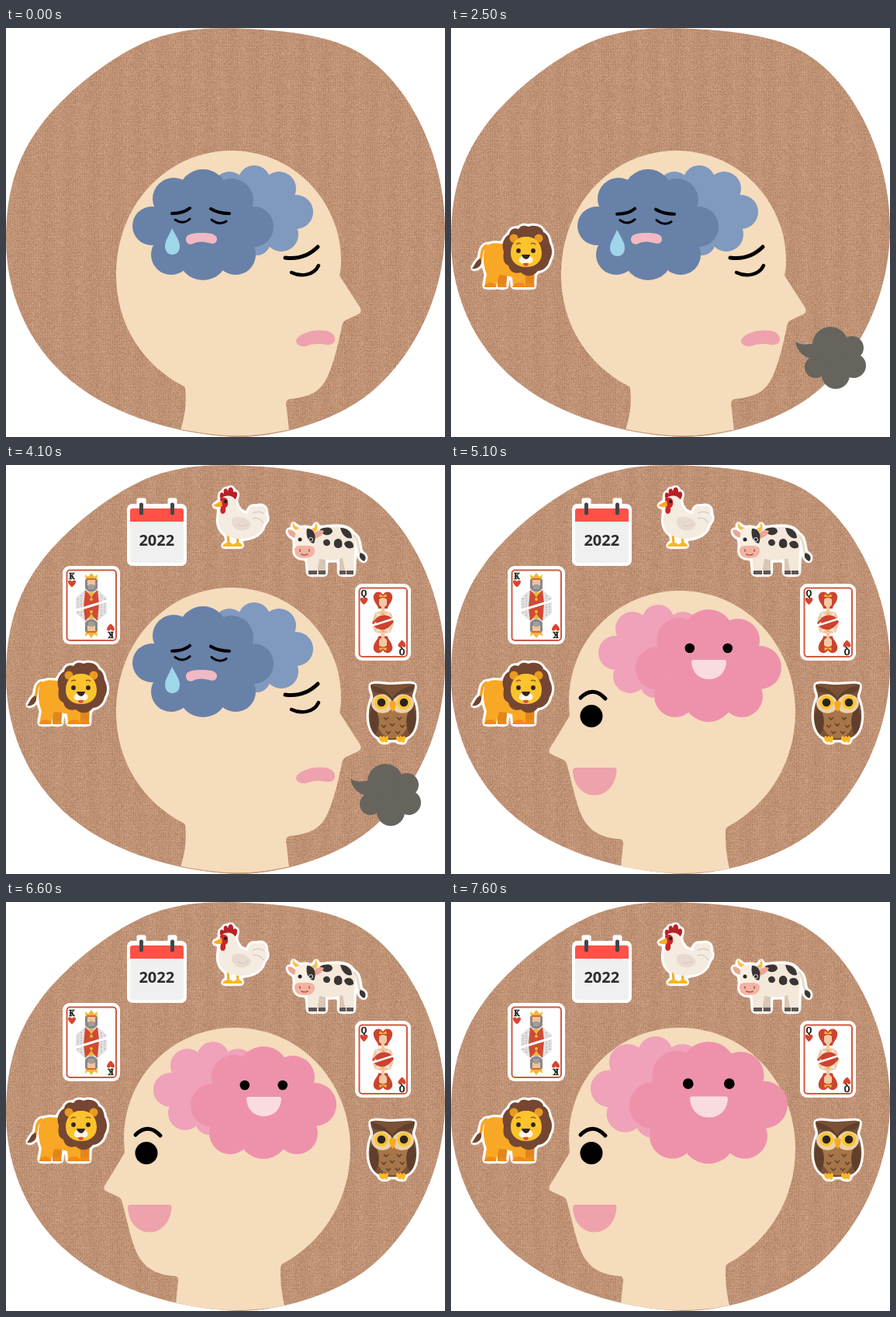
These frames come from a looping animation (566 by 527 pixels, 8 s). An HTML page with a canvas:

```html
<!DOCTYPE html>
<html lang="en">
<head>
<meta charset="utf-8">
<title>Memory</title>
<style>
html, body { margin: 0; width: 100%; height: 100%; overflow: hidden; background: #fff; }
canvas, svg { position: absolute; left: 0; top: 0; width: 566px; height: 527px; }
.line { fill: none; stroke: #000; stroke-linecap: round; stroke-linejoin: round; }
.sticker { filter: url(#rim); }
.year { font: 700 20px "Open Sans", "Noto Sans", sans-serif; fill: #2d2d2d; text-anchor: middle; }
.pip { font: 700 10px "Noto Serif", "Liberation Serif", serif; fill: #222; stroke: #222; stroke-width: .5; text-anchor: middle; }
</style>
</head>
<body>
<canvas id="cork" width="566" height="527"></canvas>
<svg viewBox="0 0 566 527">
  <defs>
    <filter id="rim" x="-15%" y="-15%" width="130%" height="130%" color-interpolation-filters="sRGB">
      <feGaussianBlur in="SourceAlpha" stdDeviation="2"/>
      <feColorMatrix values="0 0 0 0 1  0 0 0 0 1  0 0 0 0 1  0 0 0 12 -.4"/>
      <feMerge><feMergeNode/><feMergeNode in="SourceGraphic"/></feMerge>
    </filter>
    <clipPath id="blob"><path id="blobPath"/></clipPath>
    <path id="heart" d="M0 4.5C-3 2-5-.5-5-2.5C-5-5-1.5-5.5 0-2.8C1.5-5.5 5-5 5-2.5C5-.5 3 2 0 4.5Z" fill="#d8432f"/>
    <g id="kingHalf">
      <path d="M-8-20L-14-15L-20-10V5L20-6V-10L14-15L8-20Z" fill="#e3e1e2"/>
      <path d="M-17-9V3M-13-13V2M13-13V-5M17-9V-6" stroke="#9b9ba3" stroke-width="1.2" stroke-dasharray="1.2 2.2"/>
      <path d="M-8-20L0-12L8-20L10 -3L-10 3Z" fill="#cf4b33"/>
      <path d="M-4-17L0-10L4-17Z" fill="#f0b73a"/>
      <circle cy="-8" r="2" fill="#f0b73a"/>
      <path d="M-8-34H8V-22Q0-13-8-22Z" fill="#8b8788"/>
      <path d="M-5-34H5V-26Q0-22-5-26Z" fill="#efc39b"/>
      <path d="M-4-26Q0-29 4-26V-21H-4Z" fill="#a39d9a"/>
      <path d="M-7-33L-8-40L-4-37L0-42L4-37L8-40L7-33Z" fill="#f0b73a"/>
      <path d="M-6-34H6" stroke="#cf4b33" stroke-width="1.5"/>
    </g>
    <g id="queenHalf">
      <path d="M0-36C-4-43-14-39-12-31C-11-25-6-22-6-18H6C6-22 11-25 12-31C14-39 4-43 0-36Z" fill="#cc432e"/>
      <path d="M-5-30Q0-34 5-30V-23Q0-16-5-23Z" fill="#f3c8a4"/>
      <path d="M-5-33L-4-37L0-34L4-37L5-33Z" fill="#f0b73a"/>
      <path d="M-2-20H2V-15L10-13L14-4L9 1L7-7L6-3L-8 3L-14-2L-10-13L-2-15Z" fill="#f3c8a4"/>
      <path d="M-9-14Q0-6 9-14L7-4L-7 1Z" fill="#eee4df"/>
      <path d="M-7-7Q0-12 8-8L13-4L-12 4L-14 0Z" fill="#cc432e"/>
      <circle cy="-11" r="1.8" fill="#f0b73a"/>
    </g>
  </defs>

  <g id="sad">
    <path clip-path="url(#blob)" fill="#f5dcbc" d="M142 318C142 225 210 158 290 158C370 158 432 222 432 300C432 308 431 315 430 319L457 361Q459 366 454 369L437 377Q434 379 433 384C429 404 424 427 416 446C407 468 394 475 366 478Q361 479 361 484L365 518Q300 533 225 518Q234 490 231 465Q231 462 228 461C177 434 142 383 142 318Z"/>
    <path d="M225 517.5C250 522 275 526 300 526.2C323 526 345 522 365 518" fill="none" stroke="#c99a70" stroke-width="1"/>
    <g data-cloud="sadBack" fill="#8099be"></g>
    <g data-cloud="sadFront" fill="#6881a8"></g>
    <path fill="#f0b9c3" d="M232 272C232 265 243 264 252 264C262 264 272 265 272 272C272 277 267 279 262 277C255 275 247 275 241 278C236 280 232 277 232 272Z"/>
    <g id="droop">
      <path class="line" stroke-width="4" d="M214 239Q229 239 237 232M264 233Q274 239 288 239"/>
      <path class="line" stroke-width="3" d="M218 247Q228 254 237 246M265 247Q275 255 284 249"/>
    </g>
    <path id="tear" fill="#9fd6ea" d="M214 258C218 266 224 274 224 281C224 288 220 292 214.5 292C209 292 205 288 205 281C205 274 211 266 214 258Z"/>
    <path class="line" stroke-width="5" d="M360 296C375 298 390 294 402 282"/>
    <path class="line" stroke-width="4.5" d="M368 315C380 321 397 319 403 306"/>
    <path fill="#eda2ae" d="M374 404C374 396 390 390 403 389.500C418 389 424 394 424 401C424 407 418 409 412 408C402 406 394 407 387 410C381 411 375 409 374 404Z"/>
  </g>

  <g id="smoke" fill="#66645d">
    <g data-cloud="puff"></g>
    <path d="M444 404C451 409 459 408 469 406L473 426C458 428 446 418 444 404Z"/>
  </g>

  <g id="happy">
    <path clip-path="url(#blob)" fill="#f5dcbc" d="M152 305C152 225 215 162 295 162C378 162 444 230 444 318C444 383 409 438 357 466Q354 468 354 472Q353 496 359 520Q290 533 219 518L222 487Q222 482 217 482C188 480 174 467 166 446C159 427 155 405 150 388Q149 382 145 380L130 373Q125 371 127 366L153 323Z"/>
    <g id="brainBack"><g data-cloud="joyBack" fill="#efa2b9"></g></g>
    <g id="brainFront">
      <g data-cloud="joyFront" fill="#ee92ac"></g>
      <circle cx="307.800" cy="236" r="6.300"/><circle cx="356.700" cy="236" r="6.300"/>
      <path fill="#f9dbe0" d="M310 254Q310 251 313 251H352Q355 251 355 254C354 268 345 276 332.500 276C320 276 311 268 310 254Z"/>
    </g>
    <path class="line" stroke-width="5" d="M167 300Q183 284 199 301"/>
    <circle cx="181" cy="323.500" r="14.500"/>
    <path fill="#eda2ac" d="M161 390H210Q214 390 213.500 394C212 413 200 425.500 185 425.500C169 425.500 158 412 157 394Q157 390 161 390Z"/>
  </g>

  <g id="lion" class="sticker">
    <path d="M47 280C36 284 42 296 36 302" fill="none" stroke="#f5a227" stroke-width="3.500"/>
    <path d="M38 297C42 304 35 312 27 310C31 306 31 300 38 297Z" fill="#70442f"/>
    <path d="M60 312H73L71 334H60ZM93 310H108L107 334H95Z" fill="#e2861c"/>
    <path d="M43 286C45 277 55 276 66 278L95 280L110 300C110 312 103 317 96 319V333H80L79 321C72 319 67 318 62 318L58 334H43L46 317C42 308 41 296 43 286Z" fill="#f9a825"/>
    <path d="M43 334q1-6 8-6t7 6ZM79 334q2-6 9-6t8 6ZM60 334q1-5 6-5t6 5ZM95 334q2-6 7-6t6 6Z" fill="#ef8a1a"/>
    <path d="M87 259C91 253 96 255 100 256C110 252 119 258 119 263C126 266 126 273 127 277C132 286 130 294 127 299C125 309 117 313 112 313C106 321 96 321 90 315C79 318 75 311 74 306C65 302 68 292 68 288C64 278 69 269 75 266C76 259 82 257 87 259Z" fill="#754631"/>
    <circle cx="81" cy="271" r="5.500" fill="#e99a22"/><circle cx="113" cy="271" r="5.500" fill="#e99a22"/>
    <path d="M96 269C109 268 117 278 117 290C117 302 108 308 97 308C86 308 77 302 77 290C77 277 85 269 96 269Z" fill="#fcc32c"/>
    <path d="M84 279q3-3 6-1M103 278q4-2 6 1" fill="none" stroke="#8e5a27" stroke-width="1.500"/>
    <circle cx="87" cy="287" r="2.900" fill="#30251f"/><circle cx="106" cy="287" r="2.900" fill="#30251f"/>
    <path d="M97 294C104 293 107 298 105 301C103 304 99 304 97 302C94 304 90 304 88 301C87 297 90 293 97 294Z" fill="#fff5e8"/>
    <path d="M91 292H102Q101 297 97 298Q92 297 91 292Z" fill="#30251f"/>
    <path d="M93 303H100Q100 307 96.500 307Q93 307 93 303Z" fill="#d95445"/>
  </g>

  <g id="king">
    <rect x="73" y="130" width="74" height="101" rx="9" fill="#fff"/>
    <rect x="78.500" y="135.500" width="63.500" height="90.500" rx="4" fill="none" stroke="#d05a42" stroke-width="2"/>
    <g data-turn="110 181">
      <use href="#kingHalf" x="110" y="181"/>
      <text class="pip" x="85" y="147">K</text>
      <use href="#heart" x="85" y="153"/>
    </g>
    <path d="M88 188L132 174.500" stroke="#fff" stroke-width="3"/>
  </g>

  <g id="calendar">
    <rect x="156" y="50" width="77" height="80" rx="7" fill="#fff"/>
    <path d="M171 45h7v12h-7zM211 45h7v12h-7z" stroke="#fff" stroke-width="5" stroke-linejoin="round" fill="#fff"/>
    <rect x="160" y="56" width="69" height="70" rx="4" fill="#f0f0f0"/>
    <path d="M160 73V59Q160 56 163 56H226Q229 56 229 59V73Z" fill="#ff5147"/>
    <path d="M174.500 51V62M214.500 51V62" stroke="#454545" stroke-width="5" stroke-linecap="round"/>
    <text class="year" x="194.300" y="104">2022</text>
  </g>

  <g id="rooster" class="sticker">
    <path d="M286 90L287 101M298 90L299 101" stroke="#f3ad23" stroke-width="3"/>
    <path d="M279 105q2-5 8-5t7 5ZM292 105q2-5 7-5t6 5Z" fill="#fbb81f"/>
    <path d="M276 42C275 35 278 34 281 37C279 30 285 28 286 34C287 26 294 28 293 35C298 32 300 38 296 44L288 48Z" fill="#b91f25"/>
    <path d="M279 42C286 37 295 40 296 47C298 57 304 62 312 63C313 54 318 51 323 54C331 49 338 57 334 63C340 68 335 74 332 76C331 87 320 94 304 95C287 96 274 86 274 72C274 62 277 54 276 49Z" fill="#f4ebe1"/>
    <path d="M292 69C300 64 312 68 316 76C314 85 301 87 295 81C291 78 290 73 292 69Z" fill="#e8dace"/>
    <path d="M318 62Q327 58 333 63M318 69Q326 66 332 75M299 77q7 4 13-1" fill="none" stroke="#dfcdbf" stroke-width="1.500"/>
    <path d="M276 43Q284 40 286 46Q287 54 283 55Q284 63 279 63Q275 62 277 54Z" fill="#c8272b"/>
    <path d="M278 46L267 52Q272 56 279 53Z" fill="#f9ac20"/>
    <circle cx="283" cy="47" r="2.200" fill="#2b2320"/>
  </g>

  <g id="cow" class="sticker">
    <path d="M447 90C457 95 452 112 459 118" fill="none" stroke="#eadbc9" stroke-width="3"/>
    <path d="M457 113C464 115 465 120 462 124C457 122 454 118 457 113Z" fill="#3b3735"/>
    <path d="M402 118H412V141H402ZM430 115H439V141H430Z" fill="#d9c6b3"/>
    <path d="M394 82C408 82 424 77 438 81C450 84 452 100 449 111L448 141H438L434 120C424 124 415 123 404 121L401 141H390L388 116Z" fill="#f4e8da"/>
    <path d="M390 136h11v5h-11zM403 136h9v5h-9zM430 136h8v5h-8zM439 136h9v5h-9z" fill="#5e5653"/>
    <path d="M405 83C413 79 421 80 421 86C417 93 407 91 405 83ZM431 81C441 81 446 87 446 94C439 96 433 90 431 81ZM409 99C411 94 418 95 418 101C416 106 409 105 409 99ZM424 97C430 92 435 97 433 105C427 110 420 105 424 97ZM436 101C440 95 449 98 448 106C443 109 437 107 436 101Z" fill="#393534"/>
    <path d="M374 84Q368 81 370 74Q373 80 379 81ZM394 82Q400 81 399 74Q405 80 398 87Z" fill="#f6bf46"/>
    <path d="M375 89Q367 81 363 84Q364 93 374 94ZM396 89Q404 82 410 85Q407 94 396 95Z" fill="#eaa795"/>
    <path d="M375 84C381 79 392 79 397 86C400 97 397 109 392 113H377C371 105 371 92 375 84Z" fill="#f9eee2"/>
    <path d="M388 82C397 81 401 91 397 101C390 101 386 91 388 82Z" fill="#393534"/>
    <path d="M372 109C373 103 379 104 385 104C392 104 398 104 398 110C398 118 391 120 385 120C378 120 372 118 372 109Z" fill="#f3b3a1"/>
    <circle cx="379" cy="96" r="2.500" fill="#2d2827"/><circle cx="393" cy="96" r="2.800" fill="#fff"/><circle cx="393" cy="96" r="2" fill="#2d2827"/>
    <path d="M379 109v2M391 109v2M381 115q4 2 8 0" class="line" style="stroke:#a45e54" stroke-width="1.700"/>
  </g>

  <g id="queen">
    <rect x="450" y="153" width="72" height="99" rx="9" fill="#fff"/>
    <rect x="455.500" y="158.500" width="61.500" height="88.500" rx="4" fill="none" stroke="#d05a42" stroke-width="2"/>
    <g data-turn="486 202.800">
      <use href="#queenHalf" x="486" y="203"/>
      <text class="pip" x="461.500" y="169">Q</text>
      <use href="#heart" x="461.500" y="175.500"/>
    </g>
    <path d="M472 207L500 198" stroke="#fff" stroke-width="2.500"/>
  </g>

  <g id="owl" class="sticker">
    <path d="M470 283C477 280 487 283 498 283C509 283 520 280 527 283C527 292 523 295 524 300C532 315 531 340 520 349C509 356 488 356 477 349C466 340 465 315 473 300C474 295 470 291 470 283Z" fill="#7a5135"/>
    <path d="M478 318C488 313 510 313 519 318C522 334 515 351 498 352C482 351 475 334 478 318Z" fill="#a87549"/>
    <path d="M473 310C467 321 467 339 476 347C483 338 483 321 473 310ZM524 310C530 321 530 339 521 347C514 338 514 321 524 310Z" fill="#60402d"/>
    <path d="M487 325l3 3 3-3M504 325l3 3 3-3M495 333l3 3 3-3M484 335l3 3 3-3M508 335l3 3 3-3M490 343l3 3 3-3M502 343l3 3 3-3" fill="none" stroke="#65442f" stroke-width="1.700"/>
    <path d="M498 301C492 292 475 294 471 304C470 317 482 323 493 318L498 313L503 318C514 323 527 317 526 304C522 294 504 292 498 301Z" fill="#ecd1a6"/>
    <path d="M470 283Q490 288 498 300Q506 288 527 283Q525 295 515 294Q503 295 498 305Q493 295 482 294Q472 295 470 283Z" fill="#60402d"/>
    <circle cx="484" cy="306" r="9" fill="#fbc42c"/><circle cx="513" cy="306" r="9" fill="#fbc42c"/>
    <circle cx="484" cy="306" r="5.300" fill="#2b2320"/><circle cx="513" cy="306" r="5.300" fill="#2b2320"/>
    <path d="M494 306Q498 302 503 306Q502 315 498.500 318Q495 315 494 306Z" fill="#f7a91f"/>
    <path d="M481 351q2-4 4 0q2-4 4 0q2-4 4 0l-1 6q-3 2-4-1q-3 3-4 0q-3 0-3-5ZM503 351q2-4 4 0q2-4 4 0q2-4 4 0l-1 6q-3 2-4-1q-3 3-4 0q-3 0-3-5Z" fill="#fbb827"/>
  </g>
</svg>
<script>
const $ = id => document.getElementById(id);
const BLOB = "M285 0C370 2 430 12 465 38C520 75 566 165 566 258C566 340 530 415 478 463C430 507 350 527 300 527C220 525 140 497 95 463C35 420 0 350 0 272C0 210 15 165 45 125C75 85 130 40 180 18C215 3 250 0 285 0Z";
$("blobPath").setAttribute("d", BLOB);

function paintCork() {
  const cv = $("cork"), g = cv.getContext("2d"), img = g.createImageData(566, 527);
  let seed = 7;
  const rnd = () => (seed = (seed * 16807) % 2147483647) / 2147483647 - .5;
  for (let y = 0, i = 0; y < 527; y++) {
    for (let x = 0; x < 566; x++, i += 4) {
      const weave = 4 * Math.sin(x * 2.1) + 2 * Math.sin(y * 1.6) + 2 * Math.sin(x * .21);
      const n = rnd() * 30 + weave, tint = rnd() * 8;
      img.data[i] = 191 + n;
      img.data[i + 1] = 146 + n;
      img.data[i + 2] = 117 + n + tint;
      img.data[i + 3] = 255;
    }
  }
  g.putImageData(img, 0, 0);
  cv.style.clipPath = `path("${BLOB}")`;
}
paintCork();

// each cloud: lobes as [x, y, r], filled in through their centres
const clouds = {
  sadBack: [[288,205,20],[320,198,21],[352,207,22],[374,237,22],[355,266,22],[323,275,18]],
  sadFront: [[188,255,25],[216,220,27],[254,214,32],[291,222,28],[319,256,26],[296,292,26],[254,293,32],[213,292,26]],
  puff: [[489,408,23],[517,412,15],[519,435,16],[496,447,18],[470,437,14]],
  joyBack: [[212,242,22],[234,211,22],[267,201,21],[299,209,20],[262,282,18],[231,272,22]],
  joyFront: [[266,262,28],[294,226,29],[332,219,33],[370,226,28],[398,261,28],[375,298,27],[332,298,33],[289,298,27]]
};
document.querySelectorAll("[data-cloud]").forEach(el => {
  const lobes = clouds[el.dataset.cloud];
  el.innerHTML = `<polygon points="${lobes.map(l => l[0] + "," + l[1]).join(" ")}"/>` +
    lobes.map(([x, y, r]) => `<circle cx="${x}" cy="${y}" r="${r}"/>`).join("");
});

// cards repeat their upper half turned by 180 degrees
document.querySelectorAll("[data-turn]").forEach(el => {
  const half = el.cloneNode(true);
  half.setAttribute("transform", `rotate(180 ${el.dataset.turn})`);
  el.after(half);
});

const LOOP = 8000, TURN = 5100;
const shown = {
  sad: [0, TURN], happy: [TURN, LOOP], smoke: [1000, TURN],
  lion: [2500, LOOP], king: [3000, LOOP], calendar: [3400, LOOP], rooster: [3700, LOOP],
  cow: [3900, LOOP], queen: [4000, LOOP], owl: [4100, LOOP]
};
const grow = (id, x, y, k) =>
  $(id).setAttribute("transform", `translate(${x} ${y}) scale(${k}) translate(${-x} ${-y})`);

function draw(t) {
  for (const id in shown) {
    const [from, to] = shown[id];
    $(id).style.display = t >= from && t < to ? "" : "none";
  }
  const low = t >= 1000 || t % 300 >= 100;
  $("tear").setAttribute("transform", `translate(0 ${low ? 2 : 0})`);
  $("droop").setAttribute("transform", `translate(0 ${low ? .7 : 0})`);
  const big = t >= 5600 && Math.floor((t - 5600) / 200) % 2 === 0;
  const k = big ? 1.085 : 1;
  grow("brainBack", 308, 261, k);
  grow("brainFront", 332, 258, k);
}

const start = performance.now();
function tick() {
  draw((performance.now() - start) % LOOP);
  requestAnimationFrame(tick);
}
draw(0);
requestAnimationFrame(tick);
</script>
</body>
</html>
```
